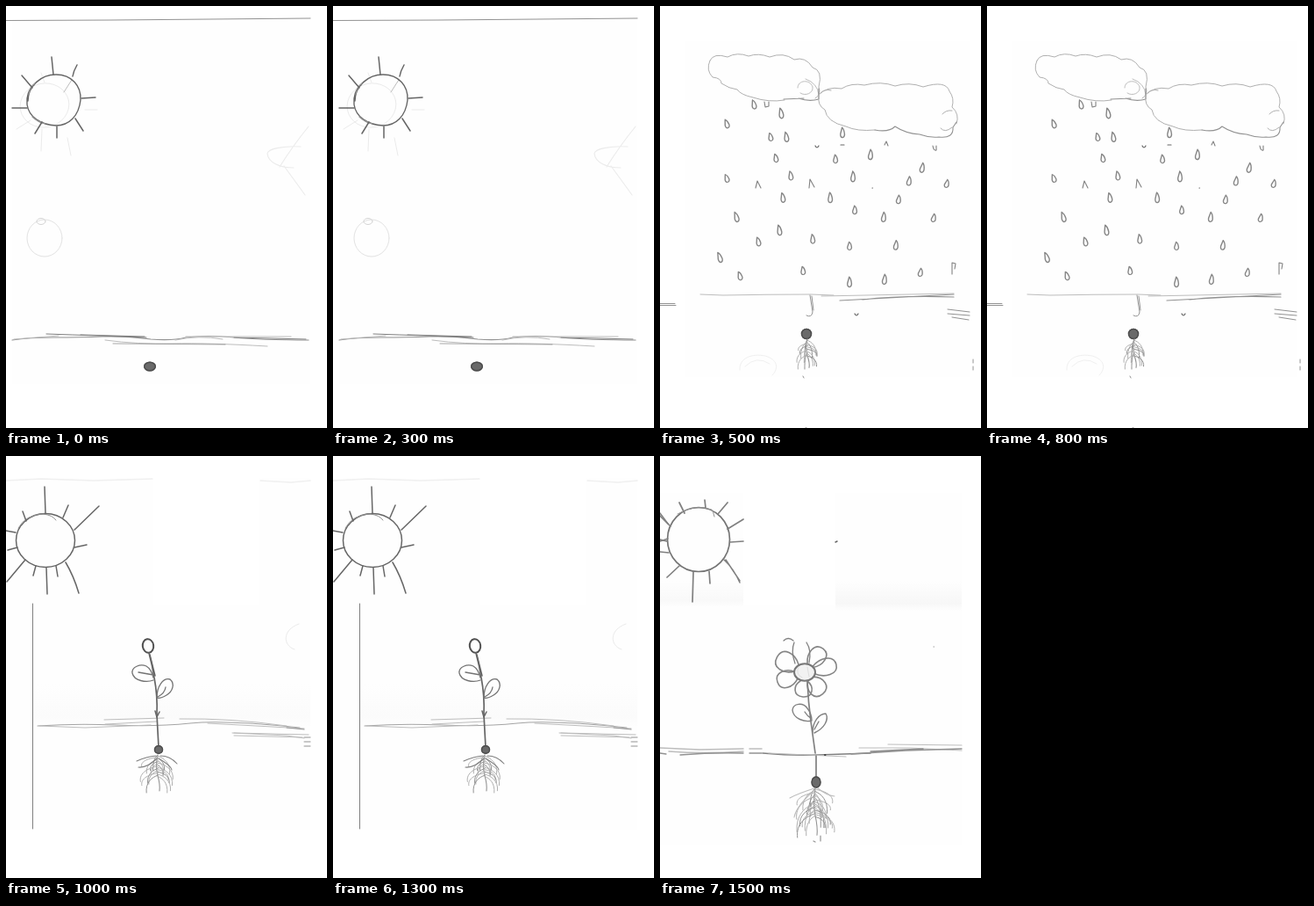
An HTML page with a canvas that plays this animation: 366 px wide and 480 px high, repeating every 2000 ms.

```html
<!DOCTYPE html>
<html lang="en">
<head>
<meta charset="utf-8">
<title>A seed grows</title>
<style>
  html, body { margin: 0; width: 100%; height: 100%; overflow: hidden; background: #fff; }
  canvas { display: block; width: 366px; height: 480px; }
</style>
</head>
<body>
<canvas id="stage"></canvas>
<script>
const W = 366, H = 480, SCENE_MS = 500;
const canvas = document.getElementById('stage');
const ctx = canvas.getContext('2d');
const ratio = window.devicePixelRatio || 1;
canvas.width = W * ratio;
canvas.height = H * ratio;
ctx.scale(ratio, ratio);
ctx.lineCap = ctx.lineJoin = 'round';

const FAINT = '#ebebeb', LIGHT = '#bdbdbd', MID = '#929292', SOFT = '#808080', DARK = '#666';

function pen(d, color = MID, width = 1) {
  ctx.strokeStyle = color;
  ctx.lineWidth = width;
  ctx.stroke(new Path2D(d));
}

function oval(x, y, rx, ry, color, width = 1, tilt = 0) {
  ctx.beginPath();
  ctx.ellipse(x, y, rx, ry, tilt, 0, Math.PI * 2);
  ctx.strokeStyle = color;
  ctx.lineWidth = width;
  ctx.stroke();
}

function paper(x, y, w, h, color = '#fefefe') {
  ctx.fillStyle = color;
  ctx.fillRect(x, y, w, h);
}

function shade(x, y, w, h, color) {
  const g = ctx.createLinearGradient(0, y, 0, y + h);
  g.addColorStop(0, '#fefefe');
  g.addColorStop(0.75, color);
  g.addColorStop(1, '#fefefe');
  paper(x, y, w, h, g);
}

function seed(x, y, rx, ry) {
  ctx.beginPath();
  ctx.ellipse(x, y, rx, ry, 0, 0, Math.PI * 2);
  ctx.fillStyle = '#6a6a6a';
  ctx.fill();
  oval(x, y, rx - 0.7, ry - 0.7, '#4c4c4c', 1.4);
}

function drop(x, y, i) {
  ctx.save();
  ctx.translate(x, y);
  ctx.rotate((x - 200) / 450);
  ctx.scale(1, 0.95 + 0.12 * Math.sin(i * 1.7));
  pen('M-.5-5.5L-2.2 1.5C-2.6 6.5 2.4 6.5 2.5 2C2.2-1 1.5-4-.5-5.5', '#868686', 1.4);
  ctx.restore();
}

function petal(degrees, length, width) {
  ctx.save();
  ctx.translate(165, 246);
  ctx.rotate(degrees * Math.PI / 180);
  pen(`M10-4C${length * 0.55} ${-width} ${length}-${width} ${length} 0S${length * 0.55} ${width} 10 4`, '#858585', 1.6);
  ctx.restore();
}

function random(state) {
  return () => (state = (state * 16807) % 2147483647) / 2147483647;
}

// Hair roots leave the main root sideways and curl downwards.
function roots(x, y, spread, depth, count, start) {
  const rnd = random(start);
  pen(`M${x} ${y}q-3 ${depth * 0.3} 0 ${depth * 0.55}t2 ${depth * 0.4}`, MID, 1.1);
  for (let i = 0; i < count; i++) {
    const side = i % 2 ? 1 : -1;
    const top = y + depth * 0.6 * i / count;
    const reach = side * spread * (0.25 + 0.75 * rnd());
    const fall = Math.min(depth * (0.2 + 0.4 * rnd()), y + depth - top);
    pen(`M${x} ${top}c${reach * 0.5} ${fall * 0.1} ${reach * 1.1} ${fall * 0.4} ${reach} ${fall}`,
        i % 3 ? '#b0b0b0' : MID);
  }
}

function sprout() {
  paper(7, 15, 340, 415);
  pen('M0 16.5L120 16L347 14', MID);

  oval(44, 113, 28, 25, FAINT, 1, -0.2);
  pen('M41 140L40 165M70 150L74 170M28 130L12 140M90 118L104 118M44 87L40 76', FAINT);
  pen('M66 98L75 84', LIGHT);
  pen('M25 108C25 91 40 78 57 78C75 78 86 91 85 107C83 125 72 136 57 136C39 135 26 126 24 112C23 103 26 94 32 90', DARK, 1.4);
  pen('M30 126Q36 132 45 134M26 101Q26 93 33 88', MID, 1.2);
  pen('M54 78L52 58M76 80Q77 74 81 67M86 105L102 104M79 128L88 142M58 137L58 150M41 132L33 145M24 116L7 116M30 93L18 79', DARK, 1.5);

  pen('M345 137Q327 159 312 183M336 160C318 159 298 162 298 168C299 178 312 184 328 184M317 182L341 215', FAINT, 1.1);
  oval(44, 264, 20, 21, '#e2e2e2');
  oval(40, 245, 5, 3.5, '#d4d4d4');

  pen('M7 380Q25 377 55 377T110 376T165 379Q190 381 205 377Q230 374 260 377T345 380', MID, 1.2);
  pen('M46 373Q75 374 105 375T160 377M85 374L158 376M260 377L342 379', SOFT);
  pen('M113 380Q150 385 190 384T298 387M9 379L60 375M193 380Q220 374 247 379M205 376L325 376', LIGHT);
  pen('M122 384L250 385', MID, 0.8);
  seed(164, 410, 7, 5.5);
}

const drops = [
  [107, 112], [138, 122], [76, 134], [126, 149], [144, 149], [208, 144],
  [132, 173], [200, 174], [240, 169], [299, 184], [76, 196], [149, 193],
  [220, 194], [284, 199], [327, 202], [140, 218], [194, 218], [272, 220],
  [222, 232], [87, 240], [255, 240], [312, 241], [112, 268], [136, 255],
  [174, 265], [216, 273], [269, 272], [68, 286], [91, 307], [163, 301],
  [216, 314], [256, 311], [297, 303]
];

function rain() {
  paper(28, 40, 325, 382);
  const cloud = '#b0b0b0';
  pen('M57 62Q61 53 77 58Q88 52 101 57Q112 53 125 58Q141 52 153 61Q166 57 174 70Q186 73 181 92Q184 101 177 105', cloud);
  pen('M57 62Q52 73 60 81Q70 82 70 88Q79 94 88 95Q92 101 106 104Q124 110 142 107', cloud);
  pen('M157 93C157 84 171 83 174 92C175 99 166 103 160 99M166 83Q180 88 181 101', LIGHT);
  pen('M141 106L164 105M158 105Q170 109 181 106L181 94', MID, 1.2);
  pen('M181 101Q190 91 207 94Q218 87 233 90Q252 85 268 91Q284 86 300 92Q326 84 330 97Q336 105 333 115Q342 123 338 134', cloud);
  pen('M181 101Q179 113 188 118Q190 132 212 137Q225 143 245 141', cloud);
  pen('M245 141Q261 144 268 137Q280 145 296 146Q307 150 318 149Q335 151 334 138L338 132', MID, 1.1);
  pen('M183 99Q188 94 195 96M322 123Q326 118 333 119M320 139Q325 145 333 138', cloud);

  drops.forEach(([x, y], i) => drop(x, y, i));
  pen('M119 109L120 115L124 114L124 109M109 207L111 199L115 207M170 207L171 197L176 206M256 158L258 154L260 159M311 159Q312 165 315 164L315 159M333 305L333 292L337 293L336 299', SOFT, 1.1);
  pen('M177 159Q179 163 181 159M206 158L210 158M242 207L242.5 207M222 350Q224 354 226 350', DARK, 1.2);

  pen('M46 328L72 329Q120 328 172 328L198 329M184 330L335 327', LIGHT);
  pen('M0 338.5L17 338.5M0 340.5L18 340.5', MID);
  pen('M231 334Q275 329 335 331M205 335L335 328', MID, 1.2);
  pen('M328 345L353 348M328 350L353 352M333 354L352 357', MID);
  pen('M171 329L174 348Q173 355 167 352M173 330L175 346', MID);
  pen('M91 414C90 400 105 395 120 398C134 402 136 412 128 420M97 410Q110 397 125 407', '#f0f0f0');
  seed(167, 373, 6.2, 6.2);
  roots(168, 379, 12, 34, 16, 91);
  pen('M163 421L164 423M357 402L357 406M357 410L357 414M166 479.8L167 479.8', MID);
}

function seedling() {
  paper(0, 25, 347, 400);
  shade(30, 260, 317, 48, '#fbfbfb');
  paper(168, 20, 121, 150, '#fff');
  pen('M0 28L40 26L100 28L167 26M290 28L325 30L347 28', '#f0f0f0', 1.5);
  pen('M30.5 168L30.5 424', SOFT);

  oval(45, 96, 33.5, 30.5, DARK, 1.5);
  pen('M14 82Q22 67 42 66Q53 67 57 73', MID);
  pen('M45 65L44 35M65 70L71 56M78 84L106 57M78 104L92 101M68 121Q77 136 83 156M57 125L59 137M46 127L47 157M34 125L31 136M22 118L1 143M13 104L2 107M11 87L0 85M23 74L19 63', DARK, 1.5);
  pen('M334 191C314 198 316 216 329 220', FAINT);

  pen('M36 307Q80 304 125 306T210 304T335 309', '#a5a5a5', 1.1);
  pen('M38 307L90 309L165 306M198 299Q255 298 320 307M112 300L180 298M113 305L172 302M230 304L340 310', LIGHT);
  pen('M258 315L320 318L340 321M260 318L338 320M260 315L345 317', LIGHT);
  pen('M320 309L340 311M340 320L347 320M340 325L347 325M340 330L347 330', MID);

  oval(162, 216, 6.2, 7.8, '#505050', 2, -0.15);
  pen('M163 224Q167 239 169 252Q173 273 172 294L174 331', DARK, 1.7);
  pen('M164 226L170 250M170 290L172 297L175 291', DARK, 1.5);
  pen('M168 255C160 258 146 256 144 247C143 240 153 236 160 239C165 242 167 248 168 252M168 249L151 246', '#737373', 1.3);
  pen('M172 275C172 262 179 252 187 254C193 259 190 268 183 272C178 275 175 276 172 275M173 274Q181 270 182 263', '#737373', 1.3);
  seed(174, 334, 5.2, 5);
  roots(173, 340, 21, 43, 20, 407);
  pen('M171 341Q160 342 149 347M176 341Q187 341 195 350M172 344Q161 355 151 354M174 344Q188 352 189 357', SOFT, 1.1);
}

function bloom() {
  paper(0, 42, 344, 400);
  shade(200, 142, 144, 34, '#f7f7f7');
  shade(0, 142, 95, 30, '#f9f9f9');
  paper(95, 38, 105, 132, '#fff');

  oval(44, 95, 35.5, 36.5, '#747474', 1.7);
  pen('M20 66Q40 54 59 61M60 62L62 69', MID);
  pen('M52 59L51 50M66 66L77 53M77 83L95 72M80 98L95 97M56 131L57 145M38 132L37 166M22 125L8 138M10 110L0 109M8 97L0 95M12 80L0 68M28 65L22 53', SOFT, 1.7);
  pen('M73 118Q84 128 91 144M75 118L91 142M9 77L0 65M9 94L0 97', SOFT, 1.5);
  pen('M200 98L202 97', DARK, 1.5);
  pen('M312 217L312.5 217', MID);

  pen('M0 332L45 334L95 333M10 336Q50 339 95 336M102 333L116 333', LIGHT, 1.5);
  pen('M0 338L7 339M23 340Q60 337 95 338M102 338L116 338', MID, 1.3);
  pen('M117 338Q150 341 180 340T240 338', SOFT, 1.5);
  pen('M124 338L212 342M227 332L285 332L344 335M260 328L344 329', LIGHT, 1.2);
  pen('M218 339L280 335L344 333M240 336L300 333', MID, 1.3);
  pen('M188 340L188.5 340', '#444', 2);

  petal(209, 36, 14);
  petal(160, 33, 12);
  petal(94, 28, 12);
  petal(50, 32, 13);
  petal(-14, 37, 12);
  petal(-52, 34, 12);
  pen('M154 236Q149 222 153 212M170 235Q173 221 167 212M141 210Q146 205 152 210', SOFT, 1.3);
  ctx.beginPath();
  ctx.ellipse(165, 246, 12, 10, 0, 0, Math.PI * 2);
  ctx.fillStyle = '#f2f2f2';
  ctx.fill();
  oval(165, 246, 12, 9.7, '#777', 2);
  pen('M158 240Q154 248 162 252M168 240L170 251', '#dedede');

  pen('M168 256Q169 280 172 302L177 338M178 341L178 366', SOFT, 1.7);
  pen('M173 301C165 303 152 299 151 289C152 281 163 280 168 287C172 292 173 297 173 301M172 298Q168 296 165 291', SOFT, 1.4);
  pen('M174 314C174 303 181 293 189 293C193 300 187 310 176 315M176 311L181 302', SOFT, 1.4);
  seed(178, 371, 5.6, 6.7);
  roots(177, 378, 22, 56, 28, 733);
  pen('M176 378Q157 384 148 389M180 378Q190 386 199 387M174 382Q155 399 153 411', LIGHT, 1.1);
  pen('M175 438L177 439M183 432L183 438', MID, 1.2);
}

const scenes = [sprout, rain, seedling, bloom];
const start = performance.now();
let shown = -1;

function tick() {
  const index = Math.floor((performance.now() - start) / SCENE_MS) % scenes.length;
  if (index !== shown) {
    shown = index;
    paper(0, 0, W, H, '#fff');
    scenes[index]();
  }
  requestAnimationFrame(tick);
}

tick();
</script>
</body>
</html>
```
